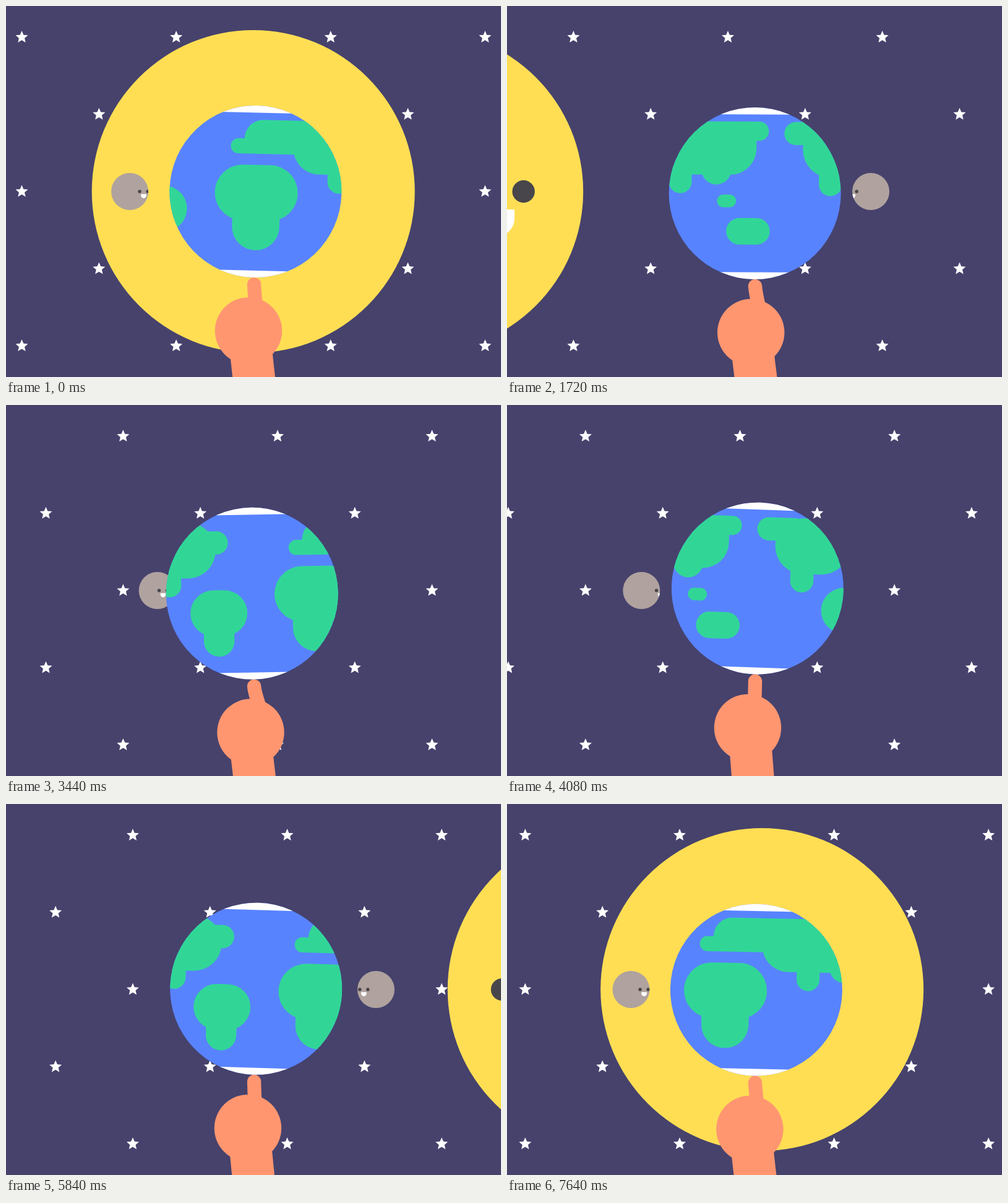
Animation of 800 by 600 pixels, one loop 7.68 s. Source, as an HTML page with a canvas:

```html
<!DOCTYPE html>
<html lang="en">
<head>
<meta charset="utf-8">
<title>Spinning globe</title>
<style>
html, body { margin: 0; width: 100%; height: 100%; overflow: hidden; background: #46426c; }
canvas { display: block; }
</style>
</head>
<body>
<canvas width="800" height="600"></canvas>
<script>
const g = document.querySelector('canvas').getContext('2d');
const LOOP = 7680, SWAY = 1920, ORBIT = 3840, SPIN = 480;
const TILE = 249.6, MAP = 612, R = 139;
const SKY = '#46426c', SUN = '#ffde54', SEA = '#5883ff', LAND = '#31d697',
      SKIN = '#ff9670', ROCK = '#b0a29e', DARK = '#48464a', WHITE = '#fff';
const star = new Path2D('M0 5.27L6.18 9 4.54 1.97 10-2.76 2.81-3.37 0-10-2.81-3.37-10-2.76-4.54 1.97-6.18 9z');

const mod = (a, n) => ((a % n) + n) % n;
const ease = p => p * p * (3 - 2 * p);

// Eased swing 0..1..0 over a period, lowest at time `low`
function swing(t, low, period = SWAY) {
  const p = mod(t - low, period) / period * 2;
  return ease(p < 1 ? p : 2 - p);
}

function disc(x, y, r, color) {
  g.fillStyle = color;
  g.beginPath();
  g.arc(x, y, r, 0, 7);
  g.fill();
}

function block(x, y, w, h, r, color) {
  g.fillStyle = color;
  g.beginPath();
  g.roundRect(x, y, w, h, r);
  g.fill();
}

const drop = (x, y, w, h, r) => block(x, y, w, h, [0, 0, r, r], LAND);
const pill = (x, y, w, h) => block(x, y, w, h, Math.min(w, h) / 2, LAND);

function face(x, scale) {
  g.save();
  g.translate(x, 0);
  g.scale(scale, scale);
  disc(-43.5, 0, 18.2, DARK);
  disc(43.5, 0, 18.2, DARK);
  block(-29, 29, 58, 43.5, [0, 0, 29, 29], WHITE);
  g.restore();
}

function ball(x, r, color, faceX, scale) {
  g.save();
  g.translate(x, 300);
  disc(0, 0, r, color);
  g.clip();
  face(faceX, scale);
  g.restore();
}

function stars(t) {
  g.fillStyle = WHITE;
  for (let row = 0; row < 5; row++) {
    const start = mod(25.6 - t * 3 * TILE / LOOP + row % 2 * TILE / 2, TILE) - TILE;
    for (let x = start; x < 820; x += TILE) {
      g.save();
      g.translate(x, 50 + row * TILE / 2);
      g.fill(star);
      g.restore();
    }
  }
}

function sun(t) {
  const u = t < LOOP / 2 ? t : t - LOOP;
  ball(400 - u * 2400 / LOOP, 261, SUN, u * 540 / LOOP, 1);
}

function moon(t) {
  const x = 200 + 400 * swing(t, 0, ORBIT);
  const u = mod(t - 960, ORBIT) - ORBIT / 2; // time from the middle of the far side
  ball(x, 30, ROCK, 45 * Math.sign(u) * ease(Math.abs(u) / 1920), .15);
}

function continents() {
  // Africa
  pill(-67, -43, 134, 90);
  drop(-38, 0, 76.5, 95, 38);
  // Eurasia
  block(-21, -116, 297, 31, [30, 15.5, 15.5, 0], LAND);
  pill(-43, -85.5, 150, 24.5);
  drop(58, -100, 198, 70, 42);
  drop(114.5, -50, 37, 50.3, 18.4);
  disc(191.3, -38, 24, LAND);
  // Oceania
  pill(192.5, 2.3, 31, 20.5);
  pill(207.5, 40, 70.5, 43);
  // South America
  pill(-203.4, -6, 92, 74);
  drop(-182.3, 40, 49.3, 61.3, 24.6);
  // North America
  pill(-281, -116, 120, 90);
  pill(-311, -115.7, 80, 37.5);
  pill(-230, -101.5, 89, 37.5);
  drop(-255, -50, 37.5, 54, 18.7);
}

function earth(t, foot) {
  g.save();
  g.translate(400, foot);
  g.rotate((4 * swing(t, 1200) - 2) * Math.PI / 180);
  g.translate(0, -R);
  disc(0, 0, R, SEA);
  g.clip();
  const shift = mod(t, SPIN) / SPIN * MAP;
  for (const x of [shift - MAP, shift]) {
    g.save();
    g.translate(x, 0);
    continents();
    g.restore();
  }
  g.fillStyle = WHITE;
  g.fillRect(-R, -R - 2, 2 * R, R + 2 - 127.5);
  g.fillRect(-R, 127.8, 2 * R, 20);
  g.restore();
}

function hand(t, foot) {
  const fist = swing(t, 520), arm = swing(t, 720);
  const bend = 7 * swing(t, 400) - 1;

  g.save();
  g.translate(392.5 + 9.5 * arm, 600);
  g.rotate(-(1.9 + 5.1 * arm) * Math.PI / 180);
  g.fillStyle = SKIN;
  g.fillRect(-34.2, -75, 68.4, 100);
  g.restore();

  disc(387.3 + 8.2 * fist, 520 + 9.5 * fist, 54.2, SKIN);

  g.strokeStyle = SKIN;
  g.lineWidth = 22.4;
  g.lineCap = 'round';
  g.beginPath();
  g.moveTo(401, foot + 11.2);
  g.quadraticCurveTo(401 + bend * .2, foot + 22, 401 + bend * 1.7, foot + 46);
  g.stroke();
}

function draw(now) {
  const t = mod(now, LOOP);
  const foot = 434 + 10 * swing(t, 480);
  const near = t % ORBIT < ORBIT / 2;
  g.fillStyle = SKY;
  g.fillRect(0, 0, 800, 600);
  stars(t);
  sun(t);
  if (!near) moon(t);
  earth(t, foot);
  hand(t, foot);
  if (near) moon(t);
}

const begin = performance.now();
function tick() {
  draw(performance.now() - begin);
  requestAnimationFrame(tick);
}
tick();
</script>
</body>
</html>
```
